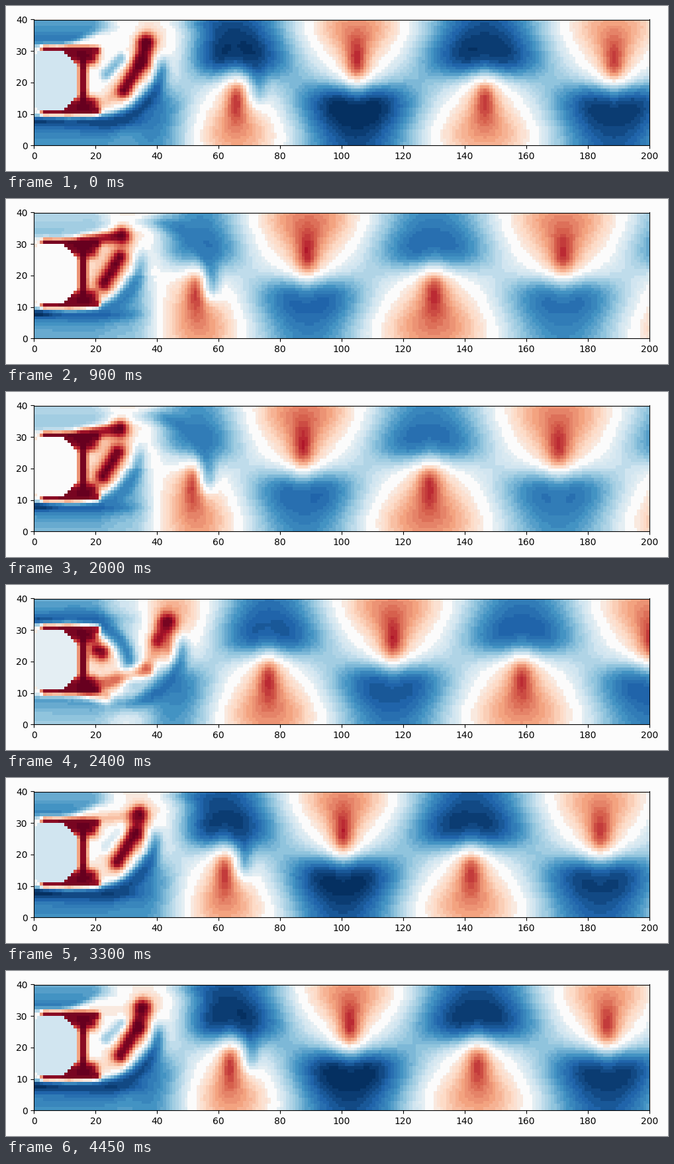
Recreate the animation shown at these times as a matplotlib script. Size 1000 by 250 pixels, loop 4.5 s.

```python
import numpy as np
import matplotlib.pyplot as plt
from matplotlib.animation import FuncAnimation
from matplotlib.colors import ListedColormap

FRAMES, STEP = 90, 50
PERIOD = 1120  # ms per shedding cycle
NX, NY, MID = 200, 41, 20
TAU = 2 * np.pi

X, Y = np.meshgrid(np.arange(NX, dtype=float), np.arange(NY, dtype=float))
ETA = (Y - MID) / MID


def smooth(t):
    t = np.clip(t, 0, 1)
    return t * t * (3 - 2 * t)


def window(t, a, b, c, d):
    """Ease in from a to b and out from c to d."""
    return smooth((t - a) / (b - a)) * smooth((d - t) / (d - c))


def sigmoid(t):
    return 1 / (1 + np.exp(-np.clip(t, -40, 40)))


def bell(t):
    return np.exp(-t ** 2)


def streak(a, b, w):
    """Soft line from a to b with half-width w."""
    dx, dy = b[0] - a[0], b[1] - a[1]
    t = ((X - a[0]) * dx + (Y - a[1]) * dy) / (dx * dx + dy * dy + 1e-9)
    t = np.clip(t, 0, 1)
    d2 = (X - a[0] - t * dx) ** 2 + (Y - a[1] - t * dy) ** 2
    return np.exp(-(d2 / w ** 2) ** 1.2)


def passing(x):
    """Phase at which a shed vortex passes x; slower near the cylinder."""
    return (x - 62) / 84 - .295 * np.exp(-(x - 28) / 18)


def vortex_x(p):
    xs = np.linspace(10, 120, 441)
    return np.interp(p, passing(xs), xs)


def street(phi):
    """Speed in the staggered vortex street."""
    th = TAU * (passing(X) - phi)
    peak = bell((X - 100) / 28)
    amp = (.6 + .4 * smooth((X - 30) / 30)) * (1 + .08 * peak)
    e2 = ETA ** 2
    ux = .76 + .3 * e2 / (e2 + .15) + amp * .59 * ETA / (e2 + .2) * np.cos(th)
    sway = np.sin(th) / np.sqrt(np.sin(th) ** 2 + .2)
    uy = .95 * amp * np.clip(1 - e2, 0, 1) ** 1.2 * sway
    return np.hypot(ux, uy)


def hook(q):
    """Lower shear layer rolling up: wake distance and fast outer ridge."""
    tip = 38 + 42 * (q - 1) + 42 * (q - 1) ** 2
    drop = 4.5 * smooth((q - 1.05) / .45) * smooth((X - 8) / 15)
    a, b = 18, 16
    dx = np.clip(X - tip + a, 0, None) / a
    dy = np.clip(Y - (9 - drop) - b, None, 0) / b
    d = (1 - np.hypot(dx, dy)) * b
    ridge = bell((d + 2.8) / 2.6) * bell((X - tip + 4) / 17)
    ridge = ridge * sigmoid((27 - Y) / 1.5) * (1 - .5 * smooth((q - 1.3) / .3))
    return sigmoid(d / .6), ridge


def shear(phi):
    """Hand over from the departing hook to the next one."""
    q = .5 + (phi - .5) % 1
    new = smooth((q - .5) / .12)
    inside, ridge = hook(q)
    old_inside, old_ridge = hook(q + 1)
    return (new * inside + (1 - new) * old_inside,
            new * ridge + (1 - new) * old_ridge)


def slow(phi):
    """Remaining speed factor from the lower vortex and its tails."""
    p = phi % 1 - 1
    s = max(p + .9, 0)
    core = vortex_x(p), 8
    tail = 20 + 55 * s ** 2, 23
    head = 20 + 36 * s, 23 - 9 * smooth(s / .25)
    blob = window(p, -.95, -.84, -.5, -.28)
    parts = (
        (tail, head, 2.3, .92 * blob),
        (tail, head, 4.5, .3 * blob),
        (head, core, 2.2, .9 * window(p, -.65, -.5, -.42, -.25)),
        (core, core, 3.2, .8 * window(p, -.9, -.7, -.4, -.2)),
        ((15, 10), core, 1.9, .8 * window(p, -.95, -.75, -.65, -.5)),
        ((18, 29), tail, 2.3, .5 * window(p, -.58, -.4, -.34, -.18)),
        ((3, 10), (20, 10.4), 1.2, .9),
        ((11, 12), (18, 12.5), 2.6, .93),
    )
    f = np.ones_like(X)
    for a, b, w, depth in parts:
        f *= 1 - depth * streak(a, b, w)
    return f


def jet(phi):
    """Speed of the stream below the cylinder."""
    beat = np.cos(TAU * (phi - .8))
    v = 1.4 + .1 * beat - .12 * (1 - np.clip(Y / 7, 0, 1))
    v = v + .1 * (1 + beat) * bell((Y - 7) / 2)
    fade = .5 - .5 * np.cos(TAU * (phi - .92))
    v = v * (1 - .4 * fade * smooth((X - 18) / 12))
    return v + .3 * max(0, beat) * bell((X - 1) / 5) * bell((Y - 8) / 1.4)


BODY = ((X - 5) ** 2 + (Y - MID) ** 2 < 98) & (X < 14) & (abs(Y - MID) < 10)
RIM = (X == 14) & (abs(Y - MID) < 5)
REAR = bell(((X - 15.5) / 1.5) ** 2) * (abs(Y - MID) < 10)


def field(phi):
    low, low_ridge = shear(phi)
    up, up_ridge = (a[::-1] for a in shear(phi + .5))
    outer = np.where(Y < MID, jet(phi), jet(phi + .5)[::-1])
    v = outer + (.8 - outer) * low * up
    v = v + (street(phi) - v) * smooth((X - 24) / 18)
    ridge = np.maximum(low_ridge, up_ridge)
    v = v + np.clip(1.6 - v, 0, None) * .85 * ridge

    # fresh fluid drawn in behind the shed vortex
    for k, flip in ((phi, 1), (phi + .5, -1)):
        spot = streak((23, 18), (28, 13), 2)[::flip]
        v = v + (1.25 - v) * .9 * bell((k % 1 - .5) / .07) * spot

    v = v * slow(phi) * slow(phi + .5)[::-1] * (1 - .9 * REAR)
    v[RIM] = .52
    v[BODY] = 1
    return v / (1.66 + .24 * np.sin(TAU * phi) ** 2)


colors = plt.get_cmap("RdBu")(np.linspace(0, 1, 41))
colors[19:22, :3] = .988
cmap = ListedColormap(colors)

fig, ax = plt.subplots(figsize=(10, 2.5), dpi=100, facecolor="#fcfcfc")
img = ax.imshow(field(0)[:40], cmap=cmap, vmin=0, vmax=1, origin="lower",
                extent=(0, 200, 0, 40), aspect="auto",
                interpolation="nearest")
ax.set_xticks(range(0, 201, 20))
ax.set_yticks(range(0, 41, 10))
fig.tight_layout()


def update(i):
    img.set_data(field(i * STEP / PERIOD)[:40])
    return [img]


anim = FuncAnimation(fig, update, frames=FRAMES, interval=STEP,
                     repeat=True, repeat_delay=0, blit=False)
plt.show()
```
